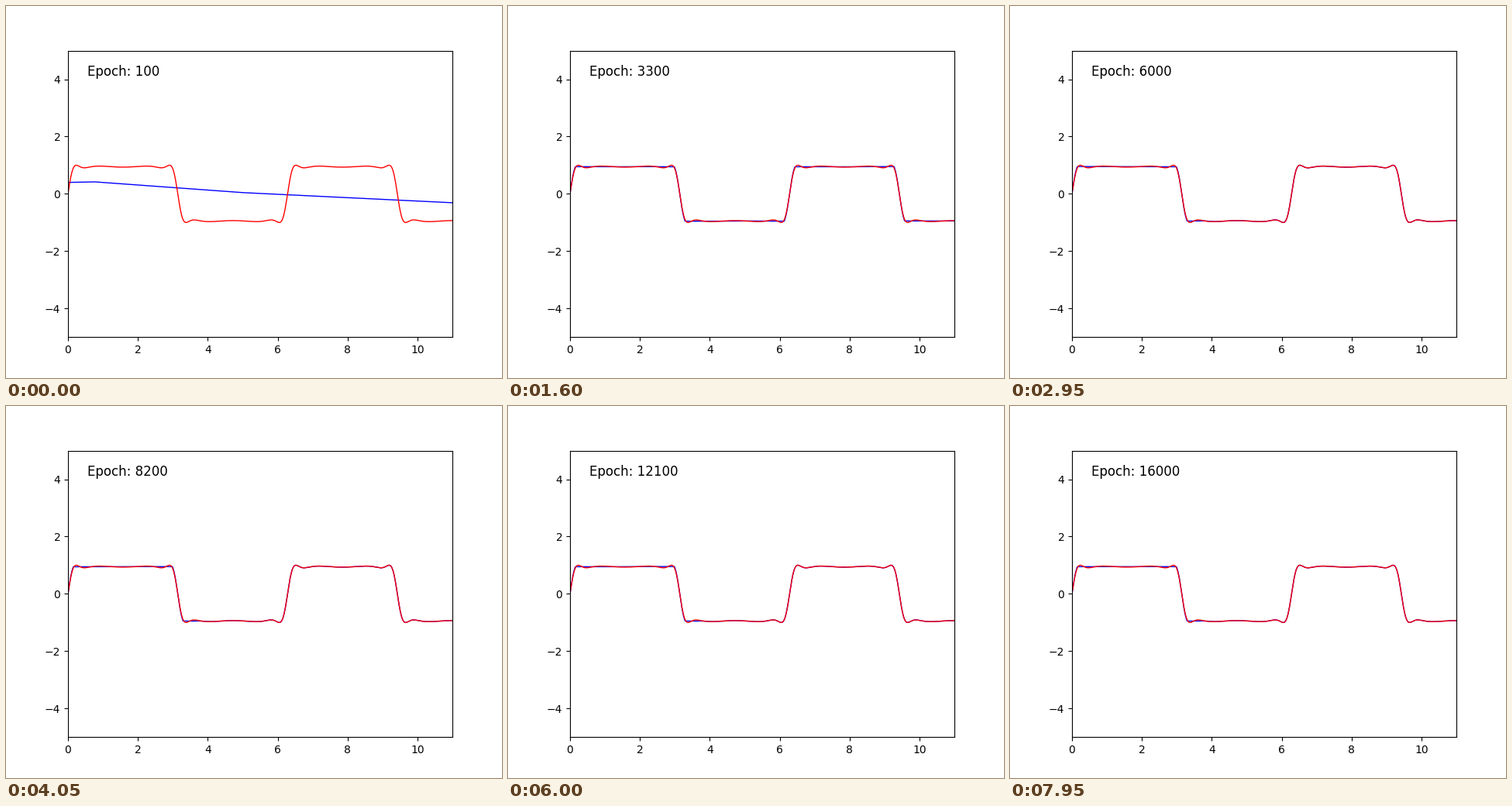
Recreate the animation shown at these times as a matplotlib script. Size 640x480 px, loop 8 s.

```python
import numpy as np
import matplotlib.pyplot as plt
from matplotlib.animation import FuncAnimation

FRAMES = 160
STEP = 100       # epochs per frame
END = 11
SPREAD = 1800    # epoch at which the fit has reached the right end

x = np.linspace(0, END, 1101)
knots = np.linspace(0, END, 12)
noise = np.random.default_rng(4).uniform(-1, 1, (FRAMES, len(knots)))


def wave(v):
    for _ in range(3):
        v = 2 * np.sin(v)
    return np.sin(v)


def ramp(v, a, b):
    return np.clip((v - a) / (b - a), 0, 1)


target = wave(x)
start = np.interp(x, [0, 0.75, 4.9, END], [0.40, 0.42, 0.05, -0.31])


def plateau_fit(late):
    """The wave with flat plateaus; its right side lags while late > 0."""
    lag = 0.025 * late * np.maximum(x - 3.4, 0)
    top = 0.95 - 0.04 * late * (1 - x / END)
    return np.clip(1.05 * wave(x - lag), -0.95, top)


def spreading_fit(u):
    """Fitted up to a front moving right, a swinging straight tail after it."""
    y = plateau_fit(1)
    front = END * u ** 0.8
    tip = -0.3 - 0.65 * u - 1.3 * np.sin(2 * np.pi * u)
    tail = np.interp(x, [front, END + 0.01], [np.interp(front, x, y), tip])
    y = np.where(x < front, y, tail)
    return start + ramp(u, 0, 0.2) * (y - start)


def fit(i):
    epoch = (i + 1) * STEP
    if epoch < SPREAD:
        return spreading_fit((epoch - STEP) / (SPREAD - STEP))
    late = 1 - ramp(epoch, SPREAD, 2600)
    # The ripples are learned from right to left, except on the first plateaus.
    edge = END + 0.5 - 7.4 * ramp(epoch, 3300, 5500)
    flat = ramp(edge - x, 0, 0.5)
    jitter = 0.006 * flat * np.interp(x, knots, noise[i])
    return target + flat * (plateau_fit(late) - target) + jitter


fig, ax = plt.subplots(figsize=(6.4, 4.8), dpi=100)
ax.set_xlim(0, END)
ax.set_ylim(-5, 5)
fit_line, = ax.plot(x, fit(0), color="blue", lw=1)
ax.plot(x, target, color="red", lw=1)
label = ax.text(0.05, 0.95, "", transform=ax.transAxes, fontsize=12, va="top")


def draw(i):
    fit_line.set_ydata(fit(i))
    label.set_text(f"Epoch: {(i + 1) * STEP}")
    return fit_line, label


anim = FuncAnimation(fig, draw, frames=FRAMES, interval=50, repeat=True,
                     repeat_delay=0)
plt.show()
```
